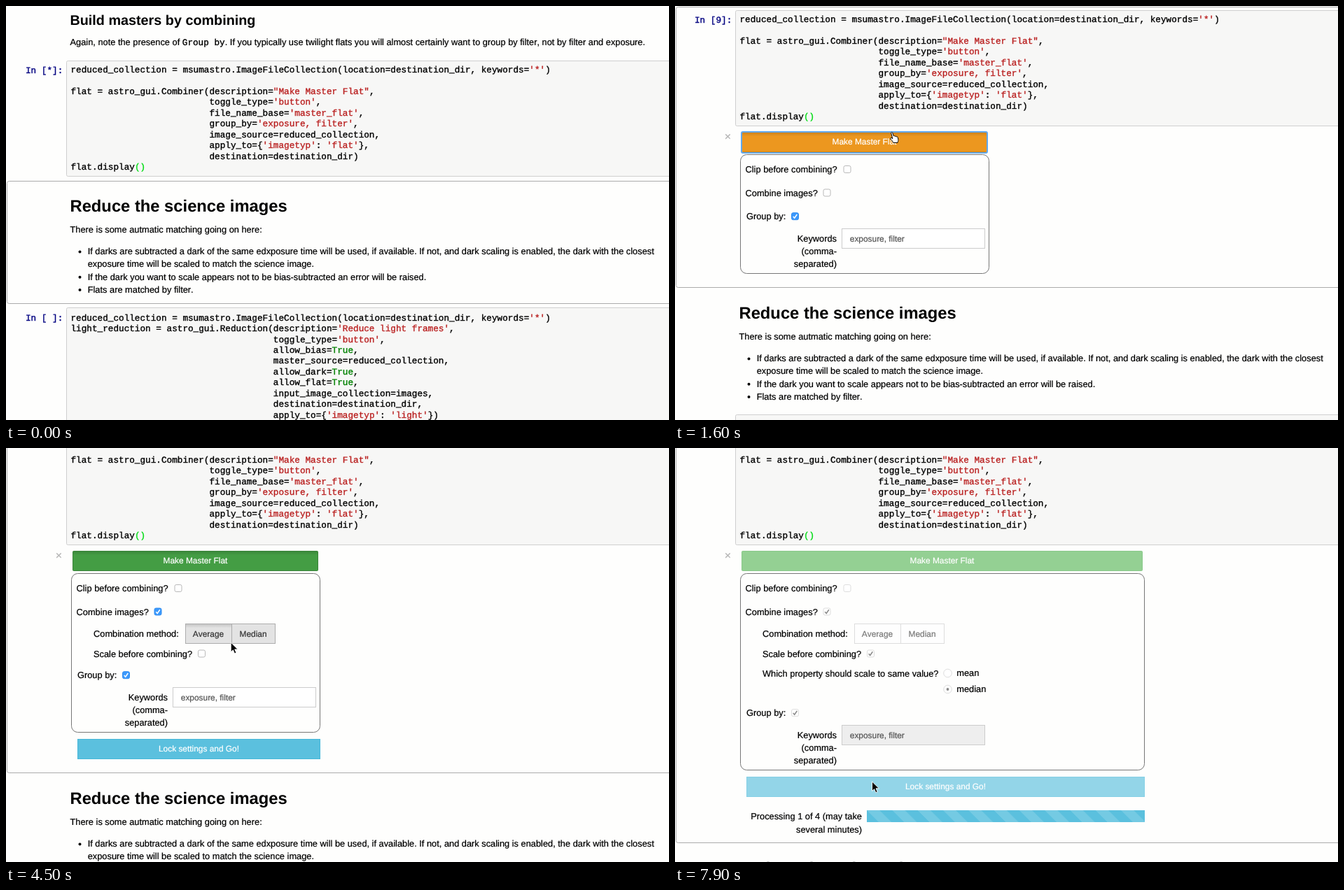
An HTML page for the animation above (8 s loop, 947x592 px).

```html
<!DOCTYPE html>
<html lang="en">
<head>
<meta charset="utf-8">
<title>Notebook: combine images</title>
<style>
html, body { margin: 0; width: 100%; height: 100%; overflow: hidden; background: #fefefd; }
svg {
  display: block; width: 947px; height: 592px;
  font: 12.82px "Liberation Sans", Arial, sans-serif;
  font-kerning: none; font-variant-ligatures: none;
  text-rendering: geometricPrecision;
  /* drop: height of the output, gap: extra rows, w: panel width */
  --drop: 0px; --gap: 0px; --w: 120px;
  --blue: #3b99fc; --blue-edge: #2f8cf0; --tick: #fff; --rim: #b8b8b8;
}
.ran { --drop: 52px; }
.open { --drop: 225px; --w: 355px; }
.ready { --drop: 320px; --gap: 57px; }
.which { --drop: 374px; --gap: 111px; --w: 356px; }
.locked { --blue: #fefefd; --blue-edge: #ddd; --tick: #8a8a8a; --rim: #ddd; }
.bar { --drop: 402px; --w: 404px; }
.named { --drop: 420px; --w: 577px; }

/* page; a thin stroke gives the text its weight */
text { fill: currentColor; stroke: currentColor; stroke-width: .22px; }
.h2 { font-weight: bold; font-size: 23.75px; stroke: none; }
.h3 { font-weight: bold; font-size: 19.8px; stroke: none; }
.mono { font: 12.69px "Liberation Mono", "Courier New", monospace; white-space: pre; stroke-width: .36px; }
.prompt { color: #000080; }
.str { color: #ba2121; }
.key { color: #008000; }
.match { color: #00dc14; }
.source { fill: #f7f7f6; stroke: #cfcfcf; }
#pick { fill: none; stroke: #ababab; y: 250.5px; height: 175px; transform: translateY(var(--drop)); }
.picked #pick { y: 73.5px; height: calc(176px + var(--drop)); transform: none; }
#tail { transform: translateY(var(--drop)); }
.ran .busy, svg:not(.ran) .done, svg:not(.ran) #out { display: none; }

/* widgets */
.on-open, .on-ready, .on-which, .on-bar, .on-named { display: none; }
.open .on-open, .ready .on-ready, .which .on-which, .bar .on-bar, .named .on-named { display: inline; }
.mid { text-anchor: middle; }
.end { text-anchor: end; }
.small { font-size: 11.9px; }
.gap { transform: translateY(var(--gap)); }
#ring { display: none; fill: none; stroke: #62a8ea; stroke-width: 2; width: calc(var(--w) - 4px); }
.focus #ring { display: inline; }
.main { width: calc(var(--w) - 5px); fill: #fff; stroke: #ccc; }
.hot .main, .focus .main { fill: #e6e6e6; stroke: #adadad; }
.open .main { fill: #ec971f; stroke: #d58512; }
.ready .main { fill: #449d44; stroke: #398439; }
.locked .main { fill: #5cb85c; stroke: #4cae4c; }
.shade { width: calc(var(--w) - 6px); fill: url(#inset); display: none; }
.focus .shade, .ready .shade { display: inline; }
.locked .shade { display: none; }
#main text { transform: translateX(calc(93px + var(--w) / 2)); color: #333; }
.open #main text { color: #fff; }
.locked #main, .locked #lock, .locked #method { opacity: .65; }
#panel { fill: none; stroke: #777; width: var(--w); height: calc(170px + var(--gap)); }
#lock rect { width: calc(var(--w) - 9px); fill: #5bc0de; stroke: #46b8da; }
.lock-hot #lock rect { fill: #31b0d5; stroke: #269abc; }
#lock text { transform: translateX(calc(98px + var(--w) / 2)); color: #fff; }
#method rect { fill: #fff; stroke: #ccc; }
#method text { color: #333; }
#method .avg, .median-hot #method .med { fill: #e3e3e3; stroke: #adadad; }
#method .in { fill: url(#inset); stroke: none; }
.locked #method .avg { fill: #fff; stroke: #ccc; }
.locked #method .in { display: none; }
.field { fill: #fff; stroke: #ccc; }
.locked .field { fill: #eee; }
#stripes { transform: translateX(-172px); }
.named #stripes { transform: none; }

/* check boxes and radio buttons */
.check { --fill: #fff; --line: var(--rim); --mark: transparent; }
#group, .combine #combine, .scale #scale, .median #median, svg:not(.median) #mean {
  --fill: var(--blue); --line: var(--blue-edge); --mark: var(--tick);
}
.check .frame { fill: var(--fill); stroke: var(--line); }
.check path { fill: none; stroke: var(--mark); stroke-width: 1.5; }
.check .dot { fill: var(--mark); }
</style>
</head>
<body>
<svg id="stage" viewBox="0 0 947 592">
  <defs>
    <linearGradient id="inset" x2="0" y2="1">
      <stop offset="0" stop-opacity=".13"/>
      <stop offset=".2" stop-opacity="0"/>
    </linearGradient>
    <pattern id="stripe" width="36.3" height="40" patternUnits="userSpaceOnUse"
             patternTransform="translate(274 518) skewX(45)">
      <rect width="36.3" height="40" fill="#5bc0de"/>
      <rect width="18.15" height="40" fill="#74cae3"/>
    </pattern>
  </defs>

  <g id="page">
    <text class="h3" x="91.5" y="27">Build masters by combining</text>
    <text x="91.5" y="56">Again, note the presence of <tspan class="mono">Group by</tspan>. If you typically use twilight flats you will almost certainly want to group by filter, not by filter and exposure.</text>
    <rect id="pick" x="1.5" width="960" rx="3"/>
    <rect class="source" x="86.5" y="78.5" width="880" height="165" rx="2"/>
    <text class="mono prompt busy" x="28" y="96">In [*]:</text>
    <text class="mono prompt done" x="28" y="96">In [9]:</text>
    <g id="combiner"></g>

    <g id="out" transform="translate(0 105)">
      <text x="70.8" y="158.6" font-size="16" color="#b4b4b4">×</text>
      <g id="main">
        <rect class="main" x="95.5" y="147.5" height="28" rx="1"/>
        <rect class="shade" x="96" y="148" height="27"/>
        <text class="small mid" y="165.3">Make Master Flat</text>
      </g>
      <rect id="ring" x="95" y="147" height="30" rx="2"/>

      <g class="on-open">
        <rect id="panel" x="93.5" y="179.5" rx="9"/>
        <text x="100.5" y="205.2">Clip before combining?</text>
        <g id="clip" class="check" transform="translate(246 200.5)"></g>
        <text x="100.5" y="238.7">Combine images?</text>
        <g id="combine" class="check" transform="translate(217 234)"></g>

        <g class="on-ready">
          <text x="125" y="270">Combination method:</text>
          <g id="method" class="small mid">
            <rect class="med" x="322.5" y="251.5" width="62" height="28"/>
            <rect class="avg" x="256.5" y="251.5" width="66" height="28"/>
            <rect class="in" x="257" y="252" width="65" height="27"/>
            <text x="289" y="269.7">Average</text>
            <text x="353" y="269.7">Median</text>
          </g>
          <text x="125" y="298.7">Scale before combining?</text>
          <g id="scale" class="check" transform="translate(279.5 294)"></g>
        </g>

        <g class="on-which">
          <text x="125" y="326.7">Which property should scale to same value?</text>
          <g id="mean" class="check radio" transform="translate(389.5 322)"></g>
          <text x="402.3" y="326">mean</text>
          <g id="median" class="check radio" transform="translate(389.5 345)"></g>
          <text x="402.3" y="349">median</text>
        </g>

        <g class="gap">
          <text x="102" y="272.2">Group by:</text>
          <g id="group" class="check" transform="translate(171.5 267.7)"></g>
          <g class="end">
            <text x="231" y="303.5">Keywords</text>
            <text x="231" y="321.7">(comma-</text>
            <text x="231" y="339.8">separated)</text>
          </g>
          <rect class="field" x="238.5" y="285.5" width="204" height="28"/>
          <text class="small" x="249.8" y="303.5" color="#555">exposure, filter</text>
        </g>
      </g>

      <g class="on-ready"><g class="gap">
        <g id="lock">
          <rect x="102.5" y="359.5" height="28"/>
          <text class="small mid" y="377.3">Lock settings and Go!</text>
        </g>
      </g></g>

      <g class="on-bar">
        <g class="on-named end">
          <text x="267" y="531.3">Processing 1 of 4 (may take</text>
          <text x="267" y="549.5">several minutes)</text>
        </g>
        <rect id="stripes" x="274" y="518" width="397" height="17" fill="url(#stripe)"/>
      </g>
    </g>

    <g id="tail">
      <text class="h2" x="91.5" y="294.3">Reduce the science images</text>
      <text x="91.5" y="324.3">There is some autmatic matching going on here:</text>
      <circle cx="105.5" cy="351.5" r="2"/>
      <text x="116.7" y="355.3">If darks are subtracted a dark of the same edxposure time will be used, if available. If not, and dark scaling is enabled, the dark with the closest</text>
      <text x="116.7" y="373.4">exposure time will be scaled to match the science image.</text>
      <circle cx="105.5" cy="387.7" r="2"/>
      <text x="116.7" y="391.5">If the dark you want to scale appears not to be bias-subtracted an error will be raised.</text>
      <circle cx="105.5" cy="406" r="2"/>
      <text x="116.7" y="409.7">Flats are matched by filter.</text>
      <rect class="source" x="86.5" y="431.5" width="880" height="200" rx="2"/>
      <text class="mono prompt" x="28" y="450">In [ ]:</text>
      <g id="reduction"></g>
    </g>
  </g>

  <g id="cursor">
    <path id="arrow" d="M0 0v13.6l3.1-2.9 2.2 5 2.4-1-2.2-4.9h4.4z" stroke="#fff" stroke-width=".9"/>
    <path id="hand" transform="translate(-1.5 .5)" fill="#fff" stroke="#000"
          d="M1.2 1.2c-.3-1.2 1.6-1.6 2-.4l1.5 4.6c.8-.6 1.8-.3 2 .5.9-.5 1.8-.1 2 .6 1-.3 1.9.1 2.1 1.1l.6 3.2c.2 1.5-.6 2.2-.9 4.2H4.4c-.6-1.8-2.6-3.6-3.9-5.2-1-1.4.6-2.5 1.9-1.4l.9.9z"/>
    <path id="beam" fill="none" stroke="#222" stroke-width="1.1"
          d="M-1-6.5q3 0 3 2v11q0 2-3 2M5-6.5q-3 0-3 2v11q0 2 3 2M.5 4h3"/>
  </g>
</svg>

<script>
const LOOP = 8000;
const $ = id => document.getElementById(id);

const combiner = [
  "reduced_collection = msumastro.ImageFileCollection(location=destination_dir, keywords='*')",
  "",
  'flat = astro_gui.Combiner(description="Make Master Flat",',
  ...[
    "toggle_type='button',",
    "file_name_base='master_flat',",
    "group_by='exposure, filter',",
    "image_source=reduced_collection,",
    "apply_to={'imagetyp': 'flat'},",
    "destination=destination_dir)"
  ].map(s => " ".repeat(26) + s),
  "flat.display()"
];
const reduction = [
  combiner[0],
  "light_reduction = astro_gui.Reduction(description='Reduce light frames',",
  ...[
    "toggle_type='button',",
    "allow_bias=True,",
    "master_source=reduced_collection,",
    "allow_dark=True,",
    "allow_flat=True,",
    "input_image_collection=images,",
    "destination=destination_dir,",
    "apply_to={'imagetyp': 'light'})"
  ].map(s => " ".repeat(38) + s)
];

function paint(line) {
  return line.replace(/'[^']*'|"[^"]*"|True|\(\)$/g, part => {
    const kind = part === "True" ? "key" : part === "()" ? "match" : "str";
    return `<tspan class="${kind}">${part}</tspan>`;
  });
}

function typeset(id, lines, y) {
  $(id).innerHTML = lines.map((line, i) =>
    `<text class="mono" x="92.5" y="${y + i * 15.43}">${paint(line)}</text>`).join("");
}

typeset("combiner", combiner, 95.2);
typeset("reduction", reduction, 449.7);

for (const el of document.querySelectorAll(".check")) {
  el.innerHTML = el.classList.contains("radio")
    ? '<circle class="frame" r="5.8"/><circle class="dot" r="1.9"/>'
    : '<rect class="frame" x="-5" y="-5" width="10" height="10" rx="2.2"/><path d="M-2.8.2-.8 2.5 2.8-2.7"/>';
}

// [class, from, until]
const states = [
  ["ran", 30], ["hot", 400, 830], ["picked", 830], ["focus", 830, 2800], ["open", 960],
  ["combine", 2800], ["ready", 3130], ["median-hot", 4300, 4530], ["scale", 5330],
  ["which", 5500], ["median", 6560], ["lock-hot", 7190, 7400], ["locked", 7400],
  ["bar", 7530], ["named", 7900]
];

// [time, shape]
const shapes = [
  [0, ""], [300, "beam"], [390, "hand"], [1170, "beam"], [1560, "hand"], [1690, "arrow"],
  [4300, "hand"], [4480, "arrow"], [7190, "hand"], [7400, "arrow"]
];

// [time, x, y]
const path = [
  [300, 214, 222], [460, 188, 262], [1130, 188, 262], [1340, 309, 180], [1930, 309, 180],
  [2360, 215, 232.5], [3630, 215, 232.5], [3930, 268, 300], [4150, 318, 308], [4430, 345, 266],
  [4455, 345, 266], [4500, 321.5, 278], [4830, 277, 293], [5730, 277, 293], [6090, 378, 362],
  [6300, 386, 344], [6925, 386, 344], [6960, 357.5, 385.5], [7230, 281.5, 477]
];

// [time, offset]
const scroll = [[1360, 0], [1460, 29], [1600, 72], [1760, 105]];

function at(track, t, ease = p => p) {
  const next = track.findIndex(key => key[0] > t);
  if (next < 0) return track[track.length - 1].slice(1);
  if (next === 0) return track[0].slice(1);
  const a = track[next - 1], b = track[next];
  const p = ease((t - a[0]) / (b[0] - a[0]));
  return a.slice(1).map((v, i) => v + (b[i + 1] - v) * p);
}

const easeOut = p => p * (2 - p);

function draw(t) {
  $("stage").setAttribute("class", states
    .filter(([, from, until = LOOP]) => t >= from && t < until)
    .map(state => state[0]).join(" "));
  $("page").setAttribute("transform", `translate(0 ${-Math.round(at(scroll, t)[0])})`);
  $("cursor").setAttribute("transform", `translate(${at(path, t, easeOut)})`);
  const shape = shapes.filter(key => key[0] <= t).pop()[1];
  for (const id of ["arrow", "hand", "beam"]) $(id).style.display = id === shape ? "" : "none";
}

const start = performance.now();
function tick() {
  draw((performance.now() - start) % LOOP);
  requestAnimationFrame(tick);
}
tick();
</script>
</body>
</html>
```
